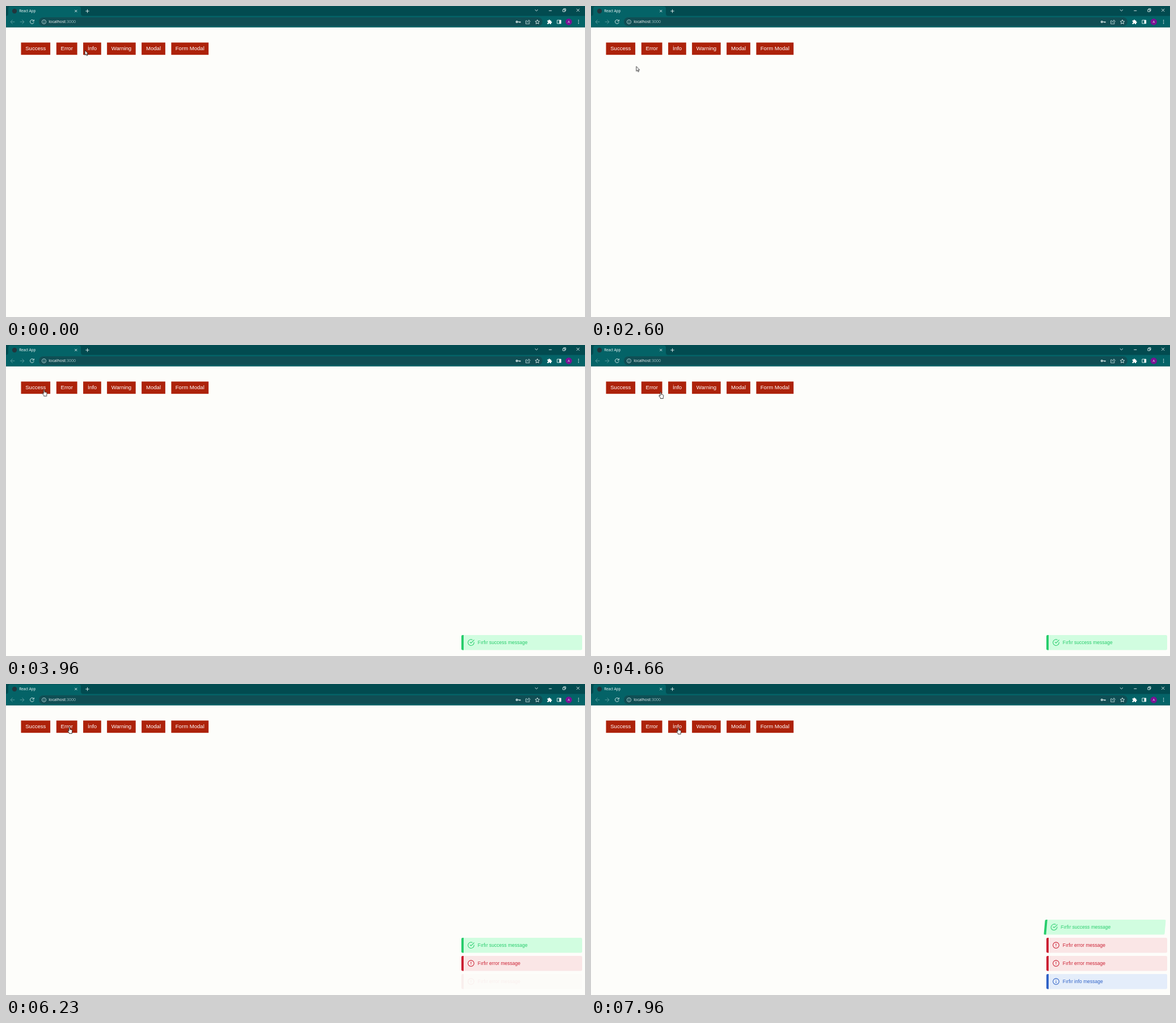
An HTML page for the animation above (8 s loop, 1021 by 549 pixels).

```html
<!DOCTYPE html>
<html lang="en">
<head>
<meta charset="utf-8">
<title>React App</title>
<style>
  html, body { margin: 0; width: 100%; height: 100%; overflow: hidden; background: #fdfdfa; }
  svg { display: block; width: 100vw; height: 100vh; }

  .ui { font-family: "Open Sans", "Noto Sans", sans-serif; fill: #fff; }
  .page { font-family: "Liberation Sans", Arial, sans-serif; }
  .line { fill: none; stroke: #e8f4f4; stroke-width: .9; }
  .dim { stroke: #5f9da0; }
  .soft { stroke: #b9d6d8; }
  .buttons rect { fill: #ad220a; }
  .buttons text { fill: #fff; font-size: 9.57px; text-anchor: middle; }

  .card { fill: var(--paper); }
  .bar { fill: var(--ink); }
  .icon { fill: none; stroke: var(--ink); stroke-width: 2; stroke-linecap: round; stroke-linejoin: round; }
  .toast text { font-size: 8.51px; fill: var(--ink); }
  .success { --ink: #27cd6c; --paper: #d1fde0; }
  .error { --ink: #cb2033; --paper: #fae6e6; }
  .info { --ink: #2f62c6; --paper: #e4edfb; }

  /* one shared 8 s clock: 1% = 80 ms */
  .stack, .toast, .leave, .cursor, .arrow, .hand { animation: 8s linear infinite; }
  .stack { animation-name: climb; animation-timing-function: step-end; }
  .toast { animation-timing-function: cubic-bezier(.16, 1, .3, 1); }
  .t1 { animation-name: show1; }
  .t2 { animation-name: show2; }
  .t3 { animation-name: show3; }
  .t4 { animation-name: show4; }
  .leave { animation-name: leave; transform-box: fill-box; transform-origin: center; }
  .cursor { animation-name: move; animation-timing-function: ease-in-out; }
  .arrow { animation-name: arrow; animation-timing-function: step-end; }
  .hand { animation-name: hand; animation-timing-function: step-end; }

  @keyframes climb {
    0% { transform: translateY(96px); }
    66.5% { transform: translateY(64px); }
    77.8% { transform: translateY(32px); }
    96.5%, 100% { transform: none; }
  }
  @keyframes show1 { 0%, 40.3% { opacity: 0; } 49%, 100% { opacity: 1; } }
  @keyframes show2 { 0%, 66.5% { opacity: 0; } 75.2%, 100% { opacity: 1; } }
  @keyframes show3 { 0%, 77.8% { opacity: 0; } 86.5%, 100% { opacity: 1; } }
  @keyframes show4 { 0%, 96.5% { opacity: 0; } 100% { opacity: 1; } }
  @keyframes leave {
    0%, 98.6% { transform: none; }
    99.5%, 100% { transform: translateX(-3.4px) skewX(-5deg); }
  }
  @keyframes move {
    0%, .3% { transform: translate(139px, 78px); }
    10%, 10.6% { transform: translate(350px, 178px); }
    12.5% { transform: translate(381px, 180px); }
    17.6% { transform: translate(381px, 180px); animation-timing-function: ease-in; }
    26% { transform: translate(230px, 238px); animation-timing-function: ease-out; }
    36.25%, 44.5% { transform: translate(46px, 77px); }
    58.25% { transform: translate(123px, 83px); }
    59.5%, 61.1% { transform: translate(111px, 78px); }
    61.6%, 78.2% { transform: translate(112px, 76px); }
    87%, 88.3% { transform: translate(147px, 79px); }
    90.75%, 93.2% { transform: translate(150px, 77px); }
    93.75%, 100% { transform: translate(154px, 77px); }
  }
  @keyframes arrow {
    0% { visibility: visible; }
    34% { visibility: hidden; }
    50.5% { visibility: visible; }
    51.9% { visibility: hidden; }
    82.1% { visibility: visible; }
    83.5%, 100% { visibility: hidden; }
  }
  @keyframes hand {
    0% { visibility: hidden; }
    34% { visibility: visible; }
    50.5% { visibility: hidden; }
    51.9% { visibility: visible; }
    82.1% { visibility: hidden; }
    83.5%, 100% { visibility: visible; }
  }
</style>
</head>
<body>
<svg viewBox="0 0 1021 549" preserveAspectRatio="none">
  <defs>
    <g id="card">
      <rect class="card" x="803" width="213" height="26.5" rx="2.2"/>
      <path class="bar" d="M807 0H805.2Q803 0 803 2.2V24.3Q803 26.5 805.2 26.5H807Z"/>
    </g>
    <g id="alert">
      <circle cx="12" cy="12" r="10"/>
      <path d="M12 7.5V12.5M12 16.3V16.4"/>
    </g>
  </defs>

  <!-- browser bar -->
  <g class="ui">
    <rect width="1021" height="37.6" fill="#024b50"/>
    <path d="M0 17.5Q4 17.5 4 13.5V4.5Q4 .8 8 .8H128Q132 .8 132 4.5V13.5Q132 17.5 136 17.5H1021V37.6H0Z" fill="#046367"/>
    <rect x="58" y="20" width="888" height="15.6" rx="7.8" fill="#104e54"/>
    <circle cx="15" cy="9" r="4.2" fill="#22363d"/>
    <text x="23.3" y="11.3" font-size="6.2">React App</text>
    <text x="75.3" y="30.4" font-size="7.1">localhost<tspan fill="#9fc0c2">:3000</tspan></text>

    <g class="line">
      <path d="M121.3 6.9l4 4m0-4l-4 4M140.3 9h6.4M143.5 5.8v6.4"/>
      <path d="M932.8 6.4l2.6 2.4 2.6-2.4M957.3 8.3h5"/>
      <path d="M981.9 6.2h3.7v3.8h-3.7zM983.3 6v-1.2h3.7v3.8h-1.3M1006.2 4.9l5 5m0-5l-5 5"/>
      <path class="dim" d="M15.3 28H8m3.6-3.6L8 28l3.6 3.6M24.7 28H32m-3.6-3.6L32 28l-3.6 3.6"/>
      <path d="M48.5 25.6A3.4 3.4 0 1 0 49.2 28.8M49.3 24v2.8h-2.8"/>
      <circle class="soft" cx="67" cy="28" r="3.6"/>
      <path class="soft" d="M67 27.5v2.5M67 25.9v.8"/>
      <circle cx="900.8" cy="28" r="1.4" stroke-width="1.2"/>
      <path d="M902.3 28h4.7v1.6M905.2 28v1.4" stroke-width="1.2"/>
      <path class="soft" d="M919 26h-2.4v5.6h6.4v-1.8M918.6 29.4q.3-3 3.4-3v-1.8l2.3 2.6-2.3 2.4v-1.7"/>
      <path d="M937 24.4l1.1 2.4 2.6.3-1.9 1.8.5 2.6-2.3-1.3-2.3 1.3.5-2.6-1.9-1.8 2.6-.3z"/>
      <path d="M971.9 25h6.8v6h-6.8z"/>
    </g>
    <path d="M954.6 25.5h2.2q0-1.6 1.2-1.6t1.2 1.6h2v2.1q1.5 0 1.5 1.2t-1.5 1.2v2h-2.1q-.1-1.4-1.2-1.4t-1.2 1.4h-2.1v-2.1q1.4-.1 1.4-1.2t-1.4-1.2z"/>
    <rect x="975.6" y="25" width="3.2" height="6"/>
    <circle cx="992.3" cy="28" r="5.7" fill="#7b1294"/>
    <text x="992.3" y="30.2" font-size="6" text-anchor="middle">A</text>
    <circle cx="1009.6" cy="25.3" r=".8"/>
    <circle cx="1009.6" cy="28" r=".8"/>
    <circle cx="1009.6" cy="30.7" r=".8"/>
  </g>

  <!-- buttons -->
  <g class="page buttons">
    <rect x="26.5" y="64.5" width="51.6" height="21.7"/><text x="52.3" y="78.3">Success</text>
    <rect x="88.8" y="64.5" width="36.8" height="21.7"/><text x="107.2" y="78.3">Error</text>
    <rect x="136.1" y="64.5" width="31.7" height="21.7"/><text x="152" y="78.3">İnfo</text>
    <rect x="178.1" y="64.5" width="50.6" height="21.7"/><text x="203.4" y="78.3">Warning</text>
    <rect x="239.1" y="64.5" width="41.8" height="21.7"/><text x="260" y="78.3">Modal</text>
    <rect x="291.4" y="64.5" width="65.8" height="21.7"/><text x="324.3" y="78.3">Form Modal</text>
  </g>

  <!-- toasts -->
  <g class="page stack">
    <g class="toast success t1">
      <g class="leave">
        <g transform="translate(0 416)">
          <use href="#card"/>
          <g class="icon" transform="translate(813.6 6.8) scale(.532)">
            <path d="M22 11.1V12a10 10 0 1 1-5.93-9.14M22 4L12 14l-3-3"/>
          </g>
          <text x="831.8" y="16.2">Fırfır success message</text>
        </g>
      </g>
    </g>
    <g class="toast error t2">
      <g transform="translate(0 448)">
        <use href="#card"/>
        <use class="icon" href="#alert" transform="translate(813.6 6.8) scale(.532)"/>
        <text x="831.8" y="16.2">Fırfır error message</text>
      </g>
    </g>
    <g class="toast error t3">
      <g transform="translate(0 480)">
        <use href="#card"/>
        <use class="icon" href="#alert" transform="translate(813.6 6.8) scale(.532)"/>
        <text x="831.8" y="16.2">Fırfır error message</text>
      </g>
    </g>
    <g class="toast info t4">
      <g transform="translate(0 512)">
        <use href="#card"/>
        <use class="icon" href="#alert" transform="translate(826.4 19.6) scale(-.532)"/>
        <text x="831.8" y="16.2">Fırfır info message</text>
      </g>
    </g>
  </g>

  <!-- pointer -->
  <g class="cursor" fill="#fff" stroke="#111" stroke-width=".8" stroke-linejoin="round">
    <path class="arrow" d="M.2.2V8.6L2.1 6.9L3.4 9.8L4.8 9.2L3.5 6.4H6Z"/>
    <path class="hand" d="M-1 .9Q-.1-.6.8.9V4.2L3.8 4.9Q5 5.3 4.9 6.6L4.3 9.5V11.5H-.6V10.2L-3 7.2Q-3.4 5.8-2.2 6L-1 7.2Z"/>
  </g>
</svg>
</body>
</html>
```
